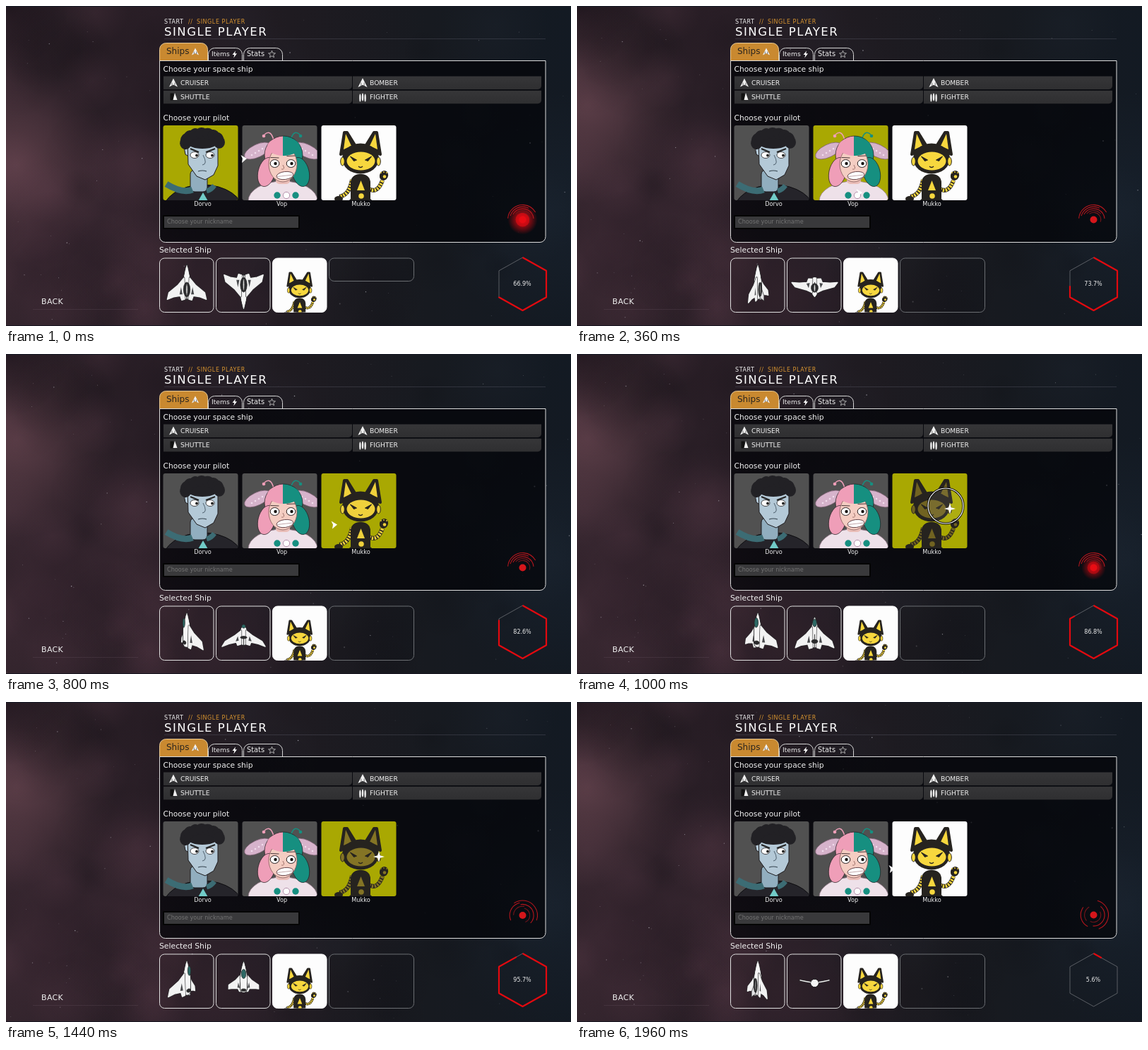
An HTML page with a canvas that plays this animation: 800x453 px, repeating every 2000 ms.

```html
<!DOCTYPE html>
<html lang="en">
<head>
<meta charset="utf-8">
<title>Single player</title>
<style>
html, body { margin: 0; width: 100%; height: 100%; overflow: hidden; background: #17151a; }
canvas { display: block; width: 800px; height: 453px; }
</style>
</head>
<body>
<canvas id="stage" width="800" height="453"></canvas>
<script>
const LOOP = 2000, STEP = 40, W = 800, H = 453, DEG = Math.PI / 180;
const FONT = '"DejaVu Sans", "Noto Sans", sans-serif';
const OLIVE = '#a9a802', GREY = '#515151', INK = '#1d1b1e';
const TEAL = '#168f80', PINK = '#ef9eb8', WHITE = '#f2f2f2';
const g = document.getElementById('stage').getContext('2d');
g.lineJoin = 'round';

// Smooth step from 0 to 1 between two times
function ease(t, from, to) {
  const k = Math.min(1, Math.max(0, (t - from) / (to - from)));
  return k * k * (3 - 2 * k);
}
function random(seed) {
  return () => (seed = seed * 16807 % 2147483647) / 2147483647;
}

function paint(fill, stroke, width = 1) {
  if (fill) { g.fillStyle = fill; g.fill(); }
  if (stroke) { g.strokeStyle = stroke; g.lineWidth = width; g.stroke(); }
}
function poly(points, fill, stroke, width) {
  g.beginPath();
  for (const [x, y] of points) g.lineTo(x, y);
  g.closePath();
  paint(fill, stroke, width);
}
function oval(x, y, rx, ry, fill, stroke, width, turn = 0) {
  g.beginPath();
  g.ellipse(x, y, rx, ry, turn, 0, 7);
  paint(fill, stroke, width);
}
function dot(x, y, r, fill, stroke, width) {
  oval(x, y, r, r, fill, stroke, width);
}
function box(x, y, w, h, r, fill, stroke, width) {
  g.beginPath();
  g.roundRect(x, y, w, h, r);
  paint(fill, stroke, width);
}
function curve(x1, y1, cx, cy, x2, y2, color, width = 1) {
  g.beginPath();
  g.moveTo(x1, y1);
  g.quadraticCurveTo(cx, cy, x2, y2);
  paint(null, color, width);
}
function line(x1, y1, x2, y2, color, width) {
  curve(x1, y1, x1, y1, x2, y2, color, width);
}
function star(x, y, n, outer, inner, fill, stroke, width) {
  const points = Array.from({ length: 2 * n }, (_, i) => {
    const r = i % 2 ? inner : outer, a = i * Math.PI / n - Math.PI / 2;
    return [x + r * Math.cos(a), y + r * Math.sin(a)];
  });
  poly(points, fill, stroke, width);
}
function text(s, x, y, size, color = '#f0f0f0', spacing = 0, align = 'left') {
  g.font = `${size}px ${FONT}`;
  g.letterSpacing = spacing * size + 'px';
  g.textAlign = align;
  g.fillStyle = color;
  g.fillText(s, x, y);
}
function glow(x, y, r, rgb, alpha) {
  const shade = g.createRadialGradient(x, y, 0, x, y, r);
  shade.addColorStop(0, `rgba(${rgb},${alpha})`);
  shade.addColorStop(1, `rgba(${rgb},0)`);
  g.fillStyle = shade;
  g.fillRect(x - r, y - r, 2 * r, 2 * r);
}

const rnd = random(4271);
const clouds = Array.from({ length: 60 }, (_, i) => ({
  x: i < 38 ? rnd() * 240 - 20 : 220 + rnd() * 590,
  y: rnd() * 470, r: 25 + rnd() * 60, dark: rnd() < 0.5, left: i < 38
}));
const stars = Array.from({ length: 75 }, () => ({
  x: rnd() * 820 - 10, y: rnd() * 470, r: 0.3 + rnd() * rnd() * 0.8, a: 0.2 + rnd() * 0.5
}));

function space(t) {
  const base = g.createLinearGradient(0, 0, W, 0);
  ['#32242c', '#291e26', '#1f1b21', '#171a20', '#131a23'].forEach((c, i) => base.addColorStop(i / 4, c));
  g.fillStyle = base;
  g.fillRect(0, 0, W, H);
  const drift = (t - 640) / 125;
  glow(15, 225 - 105 * ease(t, 0, 500), 140, '140,92,104', 0.45);
  glow(50, 345, 140, '95,58,76', 0.25);
  glow(300, 410, 170, '90,55,72', 0.25);
  glow(0, 0, 90, '5,5,10', 0.6);
  glow(780, 290, 170, '32,46,62', 0.3);
  for (const c of clouds) {
    const rgb = c.dark ? '8,8,12' : c.left ? '125,80,98' : '46,56,70';
    glow(c.x + drift, c.y - drift, c.r, rgb, 0.12);
  }
  for (const s of stars) dot(s.x + drift, s.y - drift, s.r, `rgba(225,225,235,${s.a})`);
  line(0, 0.5, W, 0.5, '#161a26');
  line(0, 452.5, W, 452.5, '#191722');
}

function miniShip(x, y, s) {
  poly([[x, y - 6 * s], [x + 6 * s, y + 6 * s], [x, y + 3 * s], [x - 6 * s, y + 6 * s]], WHITE);
  for (const d of [-2, 2]) line(x + d * s, y, x + d * s, y + 4 * s, '#333', 0.7);
}

function tab(x, y, w, fill, edge, name, size) {
  box(x, y, w, 77.5 - y, [9, 9, 0, 0], fill, edge);
  text(name, x + (fill ? 9.5 : 4.5), (y + 77.5) / 2 + size * 0.28, size, fill ? '#29241f' : '#f0f0f0');
}

function header() {
  text('START', 224, 24.5, 8, '#eee', 0.07);
  text('//', 258, 24.5, 8, '#d6932f', 0.07);
  text('SINGLE PLAYER', 270, 24.5, 8, '#d6932f', 0.07);
  text('SINGLE PLAYER', 224, 42.2, 16.5, '#fff', 0.09);
  line(224, 46.5, 764, 46.5, 'rgba(110,110,125,.3)');
  tab(217.5, 52.5, 68, '#c98930', '#e6c893', 'Ships', 12);
  tab(286.5, 59.5, 48, null, '#d5d5d5', 'Items', 9.2);
  tab(336.5, 59.5, 55, null, '#d5d5d5', 'Stats', 9.8);
  miniShip(268, 64.5, 0.85);
  poly([[325, 63.5], [320.5, 69], [323.3, 69], [322.3, 73.5], [327, 67.3], [324.2, 67.3]], '#fff');
  star(376.5, 68.5, 5, 5.2, 2.3, null, '#bbb', 0.9);
}

function panel() {
  box(217.5, 77.5, 546.5, 257, [0, 0, 8, 8], 'rgba(4,5,9,.72)', '#dcdcdc');
  text('Choose your space ship', 222.5, 92.5, 10.7);
  ['CRUISER', 'BOMBER', 'SHUTTLE', 'FIGHTER'].forEach((name, i) => {
    const x = i % 2 ? 491 : 223, y = i < 2 ? 99.5 : 119.8;
    const shade = g.createLinearGradient(0, y, 0, y + 18);
    shade.addColorStop(0, '#363638');
    shade.addColorStop(1, '#2f2f31');
    box(x, y, 267, 18.5, [0, 0, 5, 0], shade);
    text(name, x + 24, y + 12, 9.2);
  });
  miniShip(237, 108.5, 1);
  miniShip(505, 108.5, 1.1);
  box(232.5, 123.5, 5, 10, 0, '#111');
  poly([[239, 123], [242.5, 133], [236.5, 133]], WHITE);
  for (const d of [-3.6, 0, 3.6]) oval(505 + d, 129 + Math.abs(d) / 4, 1.2, 5.5, WHITE);
  text('Choose your pilot', 222.5, 161.5, 10.7);
  box(223, 297, 192, 18, 0, '#39393b', '#050505', 2);
  text('Choose your nickname', 228, 308.3, 8.1, '#737373');
}

function elf() {
  const skin = '#b4c9d7';
  oval(279, 293, 58, 40, '#25242a', '#0d0d10');
  box(261, 232, 24, 31, 6, '#91aebf', INK);
  curve(227, 252, 250, 266, 264, 260, '#3c6c74', 9);
  curve(284, 262, 291, 260, 295, 254, '#3c6c74', 7);
  star(279, 272, 3, 8, 4, '#71cbc7');
  poly([[250, 190], [262, 202], [263, 216], [254, 210]], skin, INK);
  poly([[257, 190], [300, 190], [300, 226], [294, 239], [282, 246], [270, 241], [258, 224]], skin, INK);
  oval(278, 192, 23, 10, '#222125');
  for (let i = 0; i < 9; i++) {
    const a = (175 + i * 23) * DEG;
    oval(278 + 24 * Math.cos(a), 193 + 13 * Math.sin(a), 8, 9, '#222125', null, 1, a);
  }
  for (const x of [267, 289]) {
    oval(x, 211, 6, 4.5, '#fff', INK, 0.8);
    dot(x + 3, 211.5, 1.9, '#222');
  }
  line(261, 202, 273, 207, '#222', 2);
  line(283, 207, 296, 202, '#222', 2);
  curve(279, 211, 286, 224, 278, 225, '#50616f');
  curve(272, 234, 278, 232, 284, 234, '#354450', 1.2);
}

// Runs a drawing once for each half of the two-coloured hair
function halves(draw) {
  [PINK, TEAL].forEach((color, i) => {
    g.save();
    g.beginPath();
    g.rect(i ? 392 : 292, 160, 100, 120);
    g.clip();
    draw(color);
    g.restore();
  });
}

function fay() {
  for (const side of [-1, 1]) {
    const x = d => 391 + side * d, tip = side < 0 ? PINK : TEAL;
    oval(x(35), 205, 20, 9, '#d6b3cb', '#7d5d71', 0.8, side * 0.45);
    for (let i = 0; i < 4; i++) dot(x(28 + 5 * i), 202 + 3 * i, 1.3, '#f2dcec');
    curve(x(12), 190, x(16), 174, x(25), 182, tip, 1.5);
    dot(x(26), 184, 2.3, tip);
  }
  oval(392, 276, 49, 28, '#eee1e9', '#9b7e90', 0.8);
  halves(color => {
    oval(393, 211, 27, 27, color, INK, 0.7);
    for (const side of [-1, 1]) oval(393 + 24 * side, 235, 12, 21, color, INK, 0.7, side * -0.25);
  });
  box(382, 236, 20, 16, 5, '#eabdb7');
  oval(392, 224, 20, 25, '#f4cdc2', '#865d5b', 0.8);
  halves(color => oval(393, 199, 23, 13, color));
  for (const side of [-1, 1]) {
    const x = 392 + 11.5 * side;
    oval(x, 223, 6.3, 5.5, '#fff', '#292021');
    dot(x + 1, 223, 2.2, '#17120f');
    line(x - 6, 213.5 - side, x + 6, 213.5 + side * -1.5, '#473638', 1.2);
  }
  curve(392, 225, 396, 232, 390, 231, '#a0716b');
  oval(395, 240, 12, 5.5, '#fff', '#59353a', 0.9, -0.12);
  line(384, 241.5, 406, 239, '#a78085', 0.7);
  for (const d of [-13, 0, 13]) dot(397 + d, 268, 4.7, d ? TEAL : '#fff', d ? null : '#b38eaa');
}

function robot(dark, wink) {
  const tone = c => Math.round(c * (1 - dark) + 10 * dark);
  const gold = `rgb(${tone(247)},${tone(215)},${tone(62)})`;
  const black = dark > 0.8 ? '#0a0a08' : '#26231f';
  const arm = (...path) => {
    curve(...path, black, 6);
    g.setLineDash([2.4, 1.6]);
    curve(...path, gold, 4.8);
    g.setLineDash([]);
  };
  arm(490, 246, 486, 268, 472, 270);
  arm(514, 259, 526, 266, 533, 247);
  oval(471, 273, 6, 4, black);
  box(488, 238, 28, 45, 12, black);
  oval(502, 282, 19, 13, black);
  for (const side of [-1, 1]) {
    const x = d => 502 + side * d;
    poly([[x(28), 210], [x(23), 179], [x(19), 179], [x(6), 200]], black, black, 4);
    poly([[x(24), 203], [x(21), 181], [x(13), 198]], gold);
  }
  oval(502, 216, 26, 21.5, black);
  for (const side of [-1, 1]) oval(502 + 25.5 * side, 220, 2.8, 6, gold, black);
  oval(502.5, 219.5, 20, 13, gold);
  for (const side of [-1, 1]) {
    const x = d => 502.5 + side * d;
    if (wink && side < 0) dot(x(10), 217, 1, black);
    else poly([[x(15), 213], [x(6), 218], [x(10), 219.5]], black, black, 1);
  }
  curve(499, 227, 502, 230, 505, 227, black, 1.2);
  poly([[502.5, 247], [508, 261], [497, 261]], gold);
  dot(503, 269, 3.8, gold);
  oval(535, 240, 6, 7, black, null, 1, 0.4);
  dot(536, 241.5, 2.3, gold);
  for (const d of [-4, 0, 4]) dot(535 + d, 235 + Math.abs(d) / 4, 0.9, gold);
}

function card(x, label, back, draw) {
  g.save();
  box(x, 169, 106, 106, 3, back);
  g.clip();
  draw();
  g.restore();
  text(label, x + 56, 283, 8.2, '#eee', 0, 'center');
}

function pilots(t) {
  const over = t < 160 ? 0 : t < 800 ? 1 : t < 1800 ? 2 : -1;
  const back = (i, plain) => over === i ? OLIVE : plain;
  const dark = 0.97 * ease(t, 750, 1200) * (1 - ease(t, 1200, 1680));
  card(222.5, 'Dorvo', back(0, GREY), elf);
  card(334.5, 'Vop', back(1, GREY), fay);
  card(446.5, 'Mukko', back(2, '#fdfdfd'), () => robot(dark, t >= 560 && t < 760));
}

function pointer(t) {
  const aim = ease(t, 680, 920), leave = ease(t, 1720, 1960);
  const x = 335 + 63 * ease(t, 0, 240) + 130 * aim - 84 * leave;
  const y = 216 + 48 * ease(t, 0, 240) - 45 * aim + 17 * leave;
  if (t >= 920 && t < 1720) star(x, y, 4, 8, 2.5, '#fff');
  else poly([[x - 2.5, y - 5], [x + 6, y], [x - 1, y + 6], [x, y]], '#fff');
  if (t >= 920 && t <= 1080) {
    const r = 25 + (t - 1000) / 10;
    dot(522, 215, r, null, '#000', 3);
    dot(522, 215, r, 'rgba(255,255,255,.06)', '#fff', 1.2);
  }
}

function radar(t) {
  const hot = Math.max(0, Math.cos(t / 1120 * 2 * Math.PI)), turn = ease(t, 1200, 1680);
  const x = 731.5, y = 302.5 - turn;
  dot(x, y, 5, '#d5161b');
  glow(x, y, 17 * hot + 4, '255,10,18', 0.95 * hot);
  dot(x, y, 5 + 5 * hot, `rgba(225,12,20,${0.65 * hot})`);
  for (let i = 0; i < 5; i++) {
    const spin = (i % 2 ? -80 : 100) * turn, span = i % 2 ? 100 : 145;
    const from = (185 + 12 * i + spin) * DEG;
    g.beginPath();
    g.arc(x, y, 21 - 2.7 * i, from, from + span * DEG);
    paint(null, i < 3 ? '#b5161d' : '#74151b', 1.1);
  }
}

// Small solid model: x across, y towards the nose, z through the hull
const WING = [[4, 8], [12, -2], [24, -12], [26, -21], [18, -18], [9, -17], [7, -23], [3, -22]];
function ship(cx, cy, yaw, pitch) {
  const [cw, sw, cp, sp] = [Math.cos(yaw * DEG), Math.sin(yaw * DEG), Math.cos(pitch * DEG), Math.sin(pitch * DEG)];
  const view = (x, y, z) => {
    const d = z * cw - x * sw, depth = y * sp + d * cp, s = 1 + depth * 0.012;
    return [cx + (x * cw + z * sw) * s, cy - (y * cp - d * sp) * s, depth, s];
  };
  const face = (points, fill, edge, width = 0.7) => poly(points.map(p => view(...p)), fill, edge, width);
  const ring = (y, rx, ry, z, fill) => face(Array.from({ length: 12 }, (_, i) =>
    [rx * Math.cos(i * 30 * DEG), y + ry * Math.sin(i * 30 * DEG), z]), fill, '#222');
  const wing = side => {
    const shape = WING.map(([x, y]) => [side * x, y, x * 0.2]);
    face(shape, WHITE, '#2b2b2d', 2.6);
    face(shape, WHITE, WHITE, 1.4);
    face([[side * 8, -5, 1.5], [side * 10, -15, 2], [side * 6, -15, 1]], '#48494c');
  };
  const hull = () => {
    for (const [extra, color] of [[0.8, '#2b2b2d'], [0, '#f5f5f5']]) {
      for (let s = 0; s <= 1; s += 1 / 32) {
        const p = view(0, 27 - 44 * s, 0);
        dot(p[0], p[1], 4.8 * Math.min(1, Math.pow(s * 1.9, 0.8)) * p[3] + extra, color);
      }
    }
  };
  const fin = () => face([[0, -2, 4], [0, -16, 10], [0, -23, 10], [0, -19, 3]], '#e4e4e6', '#2b2b2d');
  [[view(-14, -12, 3)[2], () => wing(-1)], [view(14, -12, 3)[2], () => wing(1)],
    [view(0, -16, 8)[2], fin], [view(0, 3, 0)[2], hull]]
    .sort((a, b) => a[0] - b[0]).forEach(part => part[1]());
  const facing = cw * cp;
  if (facing < -0.1) {
    ring(12, 3, 6.5, -5, '#2d6965');
    ring(-15, 4, 2.5, -4, '#2a2a2c');
  } else if (facing > 0.1) {
    ring(-8, 4.5, 10, 4, '#2c2c2f');
    ring(-8, 1.2, 8, 4, '#ddd');
  }
}

function slots(t) {
  text('Selected Ship', 217, 349, 10.8);
  for (const x of [217.5, 297.5]) box(x, 357, 76.5, 76.5, 7, 'rgba(0,0,0,.06)', '#e0e0e0');
  const pitch = (t - 1160) * (t < 1160 ? 0.155 : 0.112);
  ship(256, 393, t * 0.155, 0);
  ship(336.5, 398 - 5 * Math.cos(pitch * DEG), 180, pitch);
  g.save();
  box(377.5, 357, 76.5, 76.5, 7, '#fdfdfd', '#fff');
  g.clip();
  g.translate(416, 402);
  g.scale(0.61, 0.61);
  g.translate(-502.5, -219);
  robot(0, false);
  g.restore();
  box(457.5, 357, 120, 32.5 + 44 * ease(t, 0, 200), 7, 'rgba(0,0,0,.08)', '#6b6e72');
}

function meter(t) {
  const lag = 0.44 * Math.max(0, Math.sin(t / 1100 * Math.PI));
  const value = t > 1680 ? (t - 1680) / 50 : Math.min(100, 66.9 + t / 50 - lag);
  const corner = i => {
    const a = (i * 60 - 90) * DEG;
    return [731.5 + 38.7 * Math.cos(a), 393.5 + 37.5 * Math.sin(a)];
  };
  poly([0, 1, 2, 3, 4, 5].map(corner), null, '#62666b', 0.9);
  const sides = value / 100 * 6;
  g.beginPath();
  g.moveTo(...corner(0));
  for (let i = 0; i < sides; i++) {
    const [ax, ay] = corner(i), [bx, by] = corner(i + 1), k = Math.min(1, sides - i);
    g.lineTo(ax + (bx - ax) * k, ay + (by - ay) * k);
  }
  paint(null, '#e3090f', 2.2);
  text(value.toFixed(1) + '%', 731, 395.7, 8, '#eee', 0, 'center');
}

function draw(t) {
  space(t);
  header();
  panel();
  pilots(t);
  radar(t);
  slots(t);
  meter(t);
  text('BACK', 50, 422.3, 11, '#f0f0f0', 0.03);
  line(38, 429.5, 187, 429.5, 'rgba(125,105,120,.2)');
  pointer(t);
}

const start = performance.now();
function tick() {
  const t = (performance.now() - start) % LOOP;
  draw(Math.floor(t / STEP) * STEP);
  requestAnimationFrame(tick);
}
tick();
</script>
</body>
</html>
```
